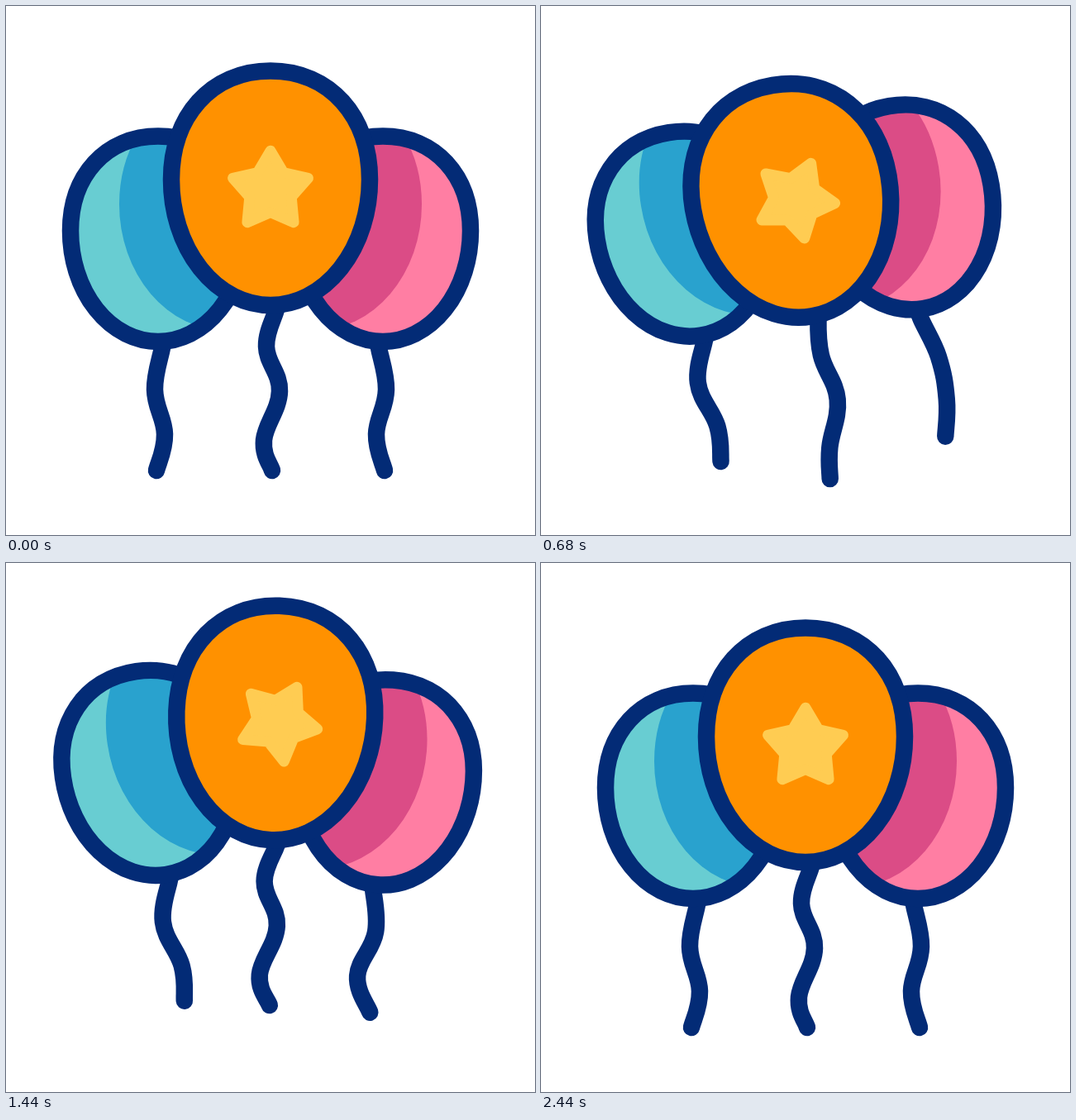
An HTML page with a canvas for the animation above (2560 ms loop, 640x640 px).

```html
<!DOCTYPE html>
<html lang="en">
<head>
<meta charset="utf-8">
<title>Balloons</title>
<style>
  html, body { margin: 0; height: 100%; overflow: hidden; background: #fff; }
  canvas { display: block; }
</style>
</head>
<body>
<canvas id="stage" width="640" height="640"></canvas>
<script>
const ctx = document.getElementById('stage').getContext('2d');
const LOOP = 2560, STEP = 40, NAVY = '#032b76', LINE = 20.5;

// Everything eases from beat to beat, and settles back to zero at REST.
const BEATS = [0, 400, 880, 1400, 1860], REST = 2440;
const LIFT = [-56, 58.5, -28, 31], SPIN = [-44, -52, -44, -47];

// size: half width, top and bottom radius. string points: x, y, flex with the tilt.
const teal = {
  x: 184, y: 282, size: [106, 114.5, 134], fill: '#68cdd2', shade: '#29a2ce', flip: 1,
  delay: 60, drift: [-2, -15, -9, 7], tilt: [-2.2, -12.9, -8.5, 3],
  knot: [6, 124], string: [[0, 0, 0], [-10, 58, 0.1], [2, 112, 1.4], [-8, 156, 3]]
};
const pink = {
  ...teal, x: 456, fill: '#ff7ea3', shade: '#db4c86', flip: -1,
  delay: 160, drift: [-13, -15, 3, 1.5], tilt: [-8, -10.5, 4.4, 1.3],
  string: [[0, 0, 0], [-10, 58, 1.5], [2, 112, 3.8], [-8, 156, 2.6]]
};
const orange = {
  x: 320, y: 220, size: [120, 131.5, 152], fill: '#ff9100', flip: 1,
  delay: 0, drift: [-10.5, -19.5, 6, 2], tilt: [-6.5, -11.5, 2, 1.3],
  knot: [8, 142], string: [[0, 0, 0], [-13, 50, 1.7], [3, 104, 2.1], [-16, 163, 3.1], [-6, 200, 2.1]]
};
const balloons = [teal, pink, orange];

const radians = degrees => degrees * Math.PI / 180;

function swing(t, values, delay = 0) {
  const times = [...BEATS.map(beat => beat + delay), REST], poses = [0, ...values, 0];
  const i = times.findIndex(time => time > t);
  if (i < 1) return 0;
  const u = (t - times[i - 1]) / (times[i] - times[i - 1]);
  return poses[i - 1] + (poses[i] - poses[i - 1]) * u * u * (3 - 2 * u);
}

function pose(balloon, t) {
  return {
    x: balloon.x + swing(t, balloon.drift),
    y: balloon.y + swing(t, LIFT, balloon.delay),
    tilt: swing(t, balloon.tilt)
  };
}

// Full shoulders above, a plain half ellipse below.
function egg(x, y, width, top, bottom) {
  const side = y - top * 0.58, shoulder = width * 0.6;
  ctx.beginPath();
  ctx.moveTo(x - width, y);
  ctx.bezierCurveTo(x - width, side, x - shoulder, y - top, x, y - top);
  ctx.bezierCurveTo(x + shoulder, y - top, x + width, side, x + width, y);
  ctx.ellipse(x, y, width, bottom, 0, 0, Math.PI);
  ctx.closePath();
}

function outline() {
  ctx.strokeStyle = NAVY;
  ctx.lineWidth = LINE;
  ctx.stroke();
}

function drawString({ flip, knot, string }, { x, y, tilt }) {
  const cos = Math.cos(radians(tilt)), sin = Math.sin(radians(tilt)), kx = knot[0] * flip;
  const left = x + kx * cos - knot[1] * sin, top = y + kx * sin + knot[1] * cos;
  const points = string.map(([px, py, flex]) => {
    const bend = -tilt * flex;
    return [left + px * flip + bend, top + py - Math.abs(bend) * 0.1];
  });
  const pull = 0.2;
  ctx.beginPath();
  ctx.moveTo(...points[0]);
  for (let i = 0; i < points.length - 1; i++) {
    const p = points[i], q = points[i + 1];
    const before = i ? points[i - 1] : [q[0], p[1]], after = points[i + 2] || q;
    ctx.bezierCurveTo(
      p[0] + (q[0] - before[0]) * pull, p[1] + (q[1] - before[1]) * pull,
      q[0] - (after[0] - p[0]) * pull, q[1] - (after[1] - p[1]) * pull, ...q);
  }
  outline();
}

function drawBalloon({ flip, size, fill, shade }, { x, y, tilt }) {
  ctx.save();
  ctx.translate(x, y);
  ctx.rotate(radians(tilt));
  ctx.scale(flip, 1);
  egg(0, -10, ...size);
  ctx.fillStyle = fill;
  ctx.fill();
  if (shade) {
    ctx.save();
    ctx.clip();
    egg(83, -42, 130, 142, 153);
    ctx.fillStyle = shade;
    ctx.fill();
    ctx.restore();
    egg(0, -10, ...size);
  }
  outline();
  ctx.restore();
}

function drawStar(x, y, angle) {
  ctx.beginPath();
  for (let i = 0; i < 10; i++) {
    const a = radians(angle + i * 36), r = i % 2 ? 26.5 : 47.8;
    ctx.lineTo(x + r * Math.sin(a), y - r * Math.cos(a));
  }
  ctx.closePath();
  ctx.fillStyle = ctx.strokeStyle = '#ffcc52';
  ctx.lineWidth = 13;
  ctx.fill();
  ctx.stroke();
}

function draw() {
  const t = Math.floor(performance.now() % LOOP / STEP) * STEP;
  const poses = balloons.map(balloon => pose(balloon, t));
  ctx.fillStyle = '#fff';
  ctx.fillRect(0, 0, 640, 640);
  ctx.lineCap = ctx.lineJoin = 'round';
  balloons.forEach((balloon, i) => drawString(balloon, poses[i]));
  balloons.forEach((balloon, i) => drawBalloon(balloon, poses[i]));
  const spin = swing(t, SPIN);
  drawStar(poses[2].x - spin / 12, poses[2].y + 3 + spin / 12, spin);
  requestAnimationFrame(draw);
}
draw();
</script>
</body>
</html>
```
